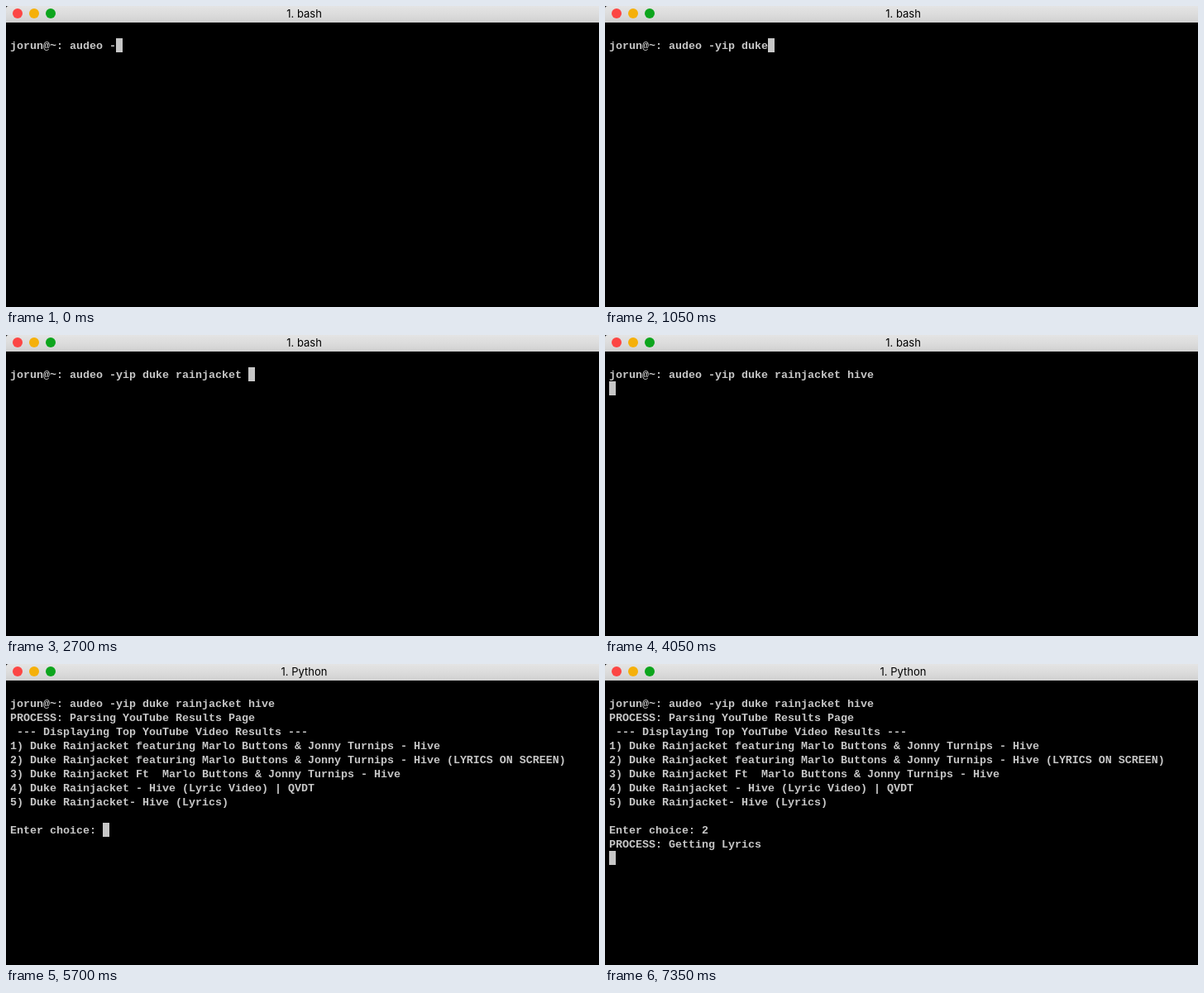
An HTML page that plays this animation: 717 by 364 pixels, repeating every 8000 ms.

```html
<!DOCTYPE html>
<html lang="en">
<head>
<meta charset="utf-8">
<title>Terminal</title>
<style>
  html, body { margin: 0; width: 100%; height: 100%; overflow: hidden; background: #000; }
  #window { position: relative; width: 717px; height: 364px; overflow: hidden; background: #000; }
  #bar {
    position: absolute; left: 0; top: 0; width: 717px; height: 20px;
    border-top-left-radius: 3px;
    background: linear-gradient(#e4e4e4, #dcdcdc 50%, #d0d0d0);
  }
  #bar i {
    position: absolute; top: 3px; width: 12px; height: 12px; border-radius: 50%;
  }
  #title {
    position: absolute; left: 4px; right: 0; top: 1px;
    font: 13px/17px Inter, Roboto, sans-serif; text-align: center; color: #000;
  }
  #screen {
    position: absolute; left: 5px; top: 40px; margin: 0; white-space: pre;
    font: bold 13.333px/17px "Liberation Mono", monospace; color: #c7c7c7;
  }
  #cursor { position: absolute; left: 0; top: 0; width: 8px; height: 17px; background: #c7c7c7; }
</style>
</head>
<body>
<div id="window">
  <div id="bar">
    <i style="left:8px;background:#fc4644"></i>
    <i style="left:28px;background:#f5b00a"></i>
    <i style="left:48px;background:#0da51d"></i>
    <div id="title"></div>
  </div>
  <div id="cursor"></div>
  <pre id="screen"></pre>
</div>
<script>
const DURATION = 8000;
const CELL = { width: 8, height: 17, left: 5, top: 39 };

const command = 'jorun@~: audeo -yip duke rainjacket hive';
const parsing = command + '\nPROCESS: Parsing YouTube Results Page\n';
const results = parsing + [
  ' --- Displaying Top YouTube Video Results ---',
  '1) Duke Rainjacket featuring Marlo Buttons & Jonny Turnips - Hive',
  '2) Duke Rainjacket featuring Marlo Buttons & Jonny Turnips - Hive (LYRICS ON SCREEN)',
  '3) Duke Rainjacket Ft  Marlo Buttons & Jonny Turnips - Hive',
  '4) Duke Rainjacket - Hive (Lyric Video) | QVDT',
  '5) Duke Rainjacket- Hive (Lyrics)',
  '',
  'Enter choice: '
].join('\n');

// Bursts of typing: start time and the command length after each keystroke tick.
const TICK = 150;
const typing = [
  [0, [16, 17, 19, 20]],
  [750, [21, 23, 24, 25, 26, 27, 28, 29]],
  [2100, [30, 31, 33, 34, 36]],
  [3600, [37, 39, 40]]
];

const steps = typing.flatMap(([start, lengths]) =>
  lengths.map((length, i) => [start + i * TICK, command.slice(0, length)]));
steps.push(
  [4050, command + '\n'],
  [4200, parsing],
  [5700, results],
  [7200, results + '2'],
  [7350, results + '2\nPROCESS: Getting Lyrics\n']
);

const title = document.getElementById('title');
const screen = document.getElementById('screen');
const cursor = document.getElementById('cursor');
let shown;

function render(time) {
  const text = steps.findLast(([start]) => start <= time)[1];
  title.textContent = time < 4800 ? '1. bash' : '1. Python';
  if (text === shown) return;
  shown = text;
  screen.textContent = text;
  const lines = text.split('\n');
  const x = CELL.left + lines.at(-1).length * CELL.width;
  const y = CELL.top + (lines.length - 1) * CELL.height;
  cursor.style.transform = `translate(${x}px, ${y}px)`;
}

const begin = performance.now();
function frame() {
  render((performance.now() - begin) % DURATION);
  requestAnimationFrame(frame);
}
frame();
</script>
</body>
</html>
```
